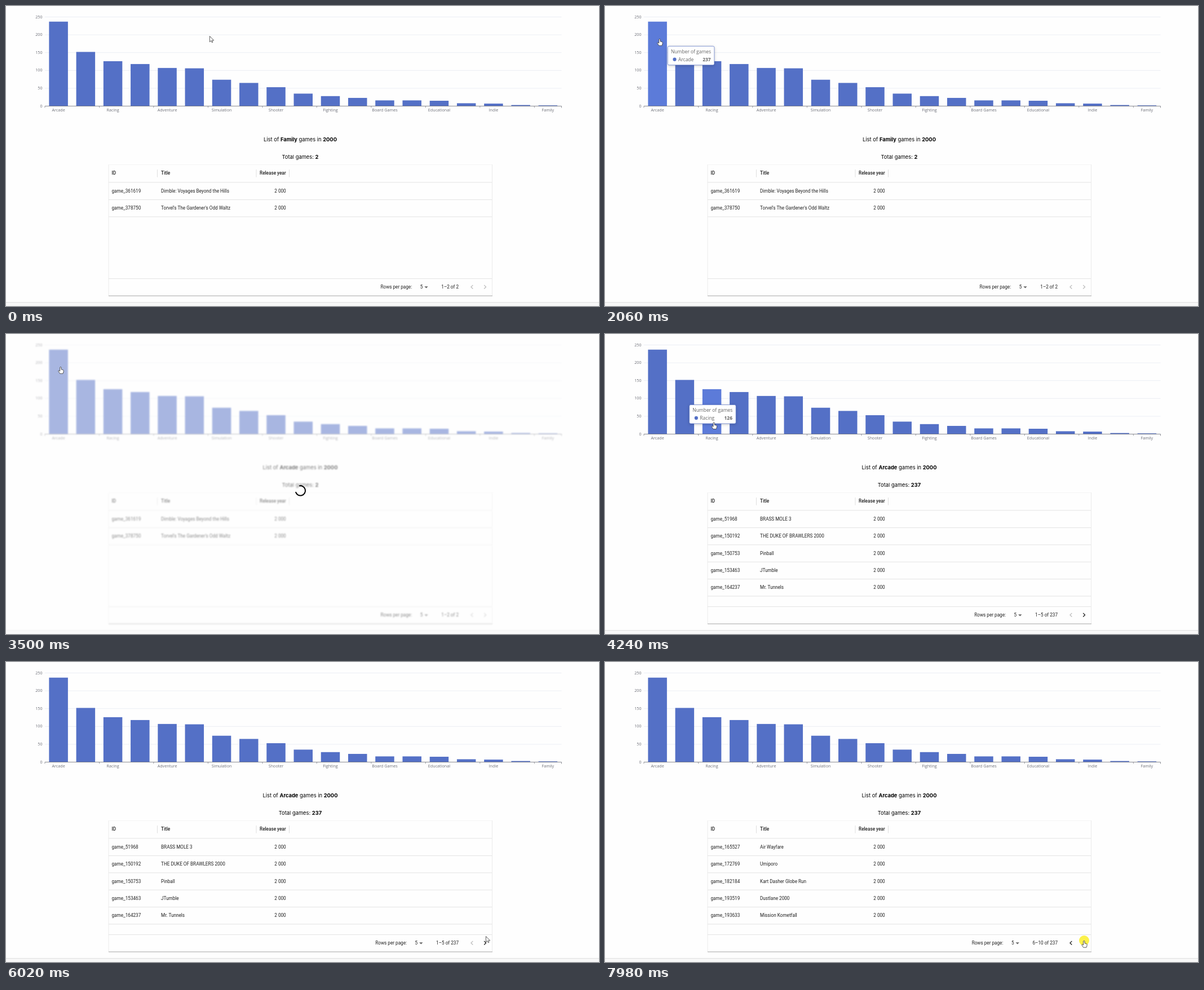
Recreate the animation shown at these times as an HTML page. Size 1052 px wide and 532 px high, loop 8 s.

```html
<!DOCTYPE html>
<html lang="en">
<head>
<meta charset="utf-8">
<title>Games by genre</title>
<style>
  html, body { margin: 0; width: 100%; height: 100%; overflow: hidden; background: #fefefe; }
  svg { display: block; width: 100%; height: 100%; }
  .chart { font: 7.2px "Open Sans", "Noto Sans", sans-serif; fill: #6e7079; }
  .tip { font: 8.45px "Open Sans", "Noto Sans", sans-serif; fill: #666; }
  .tip rect { filter: drop-shadow(.6px 1.2px 2.5px rgba(0, 0, 0, .2)); }
  .heading { font: 9.35px Inter, sans-serif; fill: #000; text-anchor: middle; }
  .grid { font: 8.18px Roboto, sans-serif; fill: #212121; }
  .loading { opacity: .5; filter: blur(1.2px); }
  .end { text-anchor: end; }
  .mid { text-anchor: middle; }
  .bold { font-weight: 700; }
  .medium { font-weight: 500; }
</style>
</head>
<body>
<svg id="stage" viewBox="0 0 1052 532"></svg>
<script>
const DURATION = 8000;
const CLICK = 2820, PICKED = 2890, BLUR = 2990, LOADED = 3560;
const NEXT_CLICK = 6500, NEXT_PICKED = 6640, NEXT_BLUR = 6700, NEXT_LOADED = 7180, LAST_CLICK = 7980;

const genres = ['Arcade', 'Action', 'Racing', 'Sports', 'Adventure', 'Platformer', 'Simulation',
  'Puzzle', 'Shooter', 'RPG', 'Fighting', 'Strategy', 'Board Games', 'Casual', 'Educational',
  'Card', 'Indie', 'Multiplayer', 'Family'];
const counts = [237, 152, 126, 118, 107, 106, 74, 65, 53, 35, 28, 23, 16, 16, 15, 8, 7, 3, 2];
const LEFT = 69, RIGHT = 985.5, BASE = 177.5, UNIT = .632;
const STEP = (RIGHT - LEFT) / genres.length, BAR = 33.5;

const familyRows = [
  ['361619', 'Dimble: Voyages Beyond the Hills'],
  ['378750', "Torvel's The Gardener's Odd Waltz"]];
const arcadeRows = [
  ['51968', 'BRASS MOLE 3'], ['150192', 'THE DUKE OF BRAWLERS 2000'], ['150753', 'Pinball'],
  ['153463', 'JTumble'], ['164237', 'Mr. Tunnels']];
const nextRows = [
  ['165527', 'Air Wayfare'], ['172769', 'Umiporo'], ['182184', 'Kart Dasher Globe Run'],
  ['193519', 'Dustlane 2000'], ['193633', 'Mission Kometfall']];

// Pointer hotspot: time, x, y
const path = [[0, 361, 53], [400, 361, 53], [1160, 243, 64], [1860, 97, 58], [3890, 97, 58],
  [4060, 135, 112], [4240, 193, 156], [4650, 320, 292], [5120, 320, 292], [5880, 847, 480],
  [6020, 851, 486], [6400, 850, 494], [DURATION, 850, 494]];

const between = (t, a, b) => t >= a && t < b;
const clamp = v => Math.max(0, Math.min(1, v));
const text = (x, y, s, cls = '') => `<text x="${x}" y="${y}" dy=".36em" class="${cls}">${s}</text>`;
const bold = s => `<tspan class="bold">${s}</tspan>`;
const rect = (x, y, w, h, fill) => `<rect x="${x}" y="${y}" width="${w}" height="${h}" fill="${fill}"/>`;
const stroke = (d, color, width = 1) =>
  `<path d="${d}" fill="none" stroke="${color}" stroke-width="${width}"/>`;

function pointerAt(t) {
  const i = path.findIndex(key => key[0] > t);
  const [t0, x0, y0] = path[i - 1], [t1, x1, y1] = path[i];
  let k = (t - t0) / (t1 - t0);
  if (t0 === 5120) k = k * k * (3 - 2 * k);
  return { x: x0 + (x1 - x0) * k, y: y0 + (y1 - y0) * k };
}

const slotAt = x => Math.floor((x - LEFT) / STEP);
const barX = i => LEFT + (i + .5) * STEP - BAR / 2;

function barUnder({ x, y }) {
  const i = slotAt(x);
  const inside = between(x, barX(i), barX(i) + BAR) && between(y, BASE - counts[i] * UNIT, BASE);
  return inside ? i : -1;
}

function chart(active) {
  let out = '';
  for (let v = 0; v <= 250; v += 50) {
    const y = BASE - v * UNIT;
    if (v) out += stroke(`M${LEFT} ${y}H${RIGHT}`, '#e6eaf2', .8);
    out += text(64.5, y - .5, v, 'end');
  }
  counts.forEach((n, i) => {
    out += rect(barX(i), BASE - n * UNIT, BAR, n * UNIT, i === active ? '#5c7bd9' : '#5470c6');
    if (i % 2 === 0) {
      out += stroke(`M${LEFT + i * STEP} ${BASE}v3`, '#6e7079', .7);
      out += text(LEFT + (i + .5) * STEP, 184.5, genres[i], 'mid');
    }
  });
  out += stroke(`M${LEFT} ${BASE}H${RIGHT}v3`, '#6e7079', .8);
  return `<g class="chart">${out}</g>`;
}

function headings(genre, total) {
  return `<g class="heading">${text(522, 236.5, `List of ${bold(genre)} games in ${bold(2000)}`)}
    ${text(522, 267.7, `Total games: ${bold(total)}`)}</g>`;
}

function table(rows, range, canGoBack, canGoOn, headerHover) {
  let out = stroke('M182 281V514M862.5 281V514', '#ebebeb') +
    stroke('M182 281.5H862', '#f5f5f5') + stroke('M182 514H863', '#c2c2c2', 1.3) +
    stroke('M182 312.8H862M182 483.5H862', '#e4e4e4') +
    stroke('M268.5 290v13.5M444 290v13.5M502.5 290v13.5', '#dedede');
  out += text(187.5, 296.5, 'ID', 'medium') + text(275, 296.5, 'Title', 'medium') +
    text(496.7, 296.5, 'Release year', 'end medium');
  if (headerHover) {
    out += stroke('M301.5 301V293M297.5 297L301.5 293L305.5 297', '#999', 1.1);
    for (const y of [293, 296.5, 300]) out += `<circle cx="433" cy="${y}" r="1.1" fill="#757575"/>`;
  }
  rows.forEach(([id, title], i) => {
    const y = 328 + i * 30.35;
    out += text(187.5, y, 'game_' + id) + text(275, y, title) + text(496.7, y, '2 000', 'end');
    out += stroke(`M182 ${y + 15.5}H862`, '#e4e4e4');
  });
  const shift = (8 - range.length) * 4.59;
  out += text(720.2 + shift, 498, 'Rows per page:', 'end') + text(734.7 + shift, 498, 5) +
    `<path d="M${742.3 + shift} 497.2h6.4l-3.2 3.2z" fill="#666"/>` + text(803, 498, range, 'end') +
    stroke('M828.3 494.9L825 498.2L828.3 501.5', canGoBack ? '#222' : '#bdbdbd', 1.3) +
    stroke('M848.2 494.9L851.5 498.2L848.2 501.5', canGoOn ? '#222' : '#bdbdbd', 1.3);
  return `<g class="grid">${out}</g>`;
}

// The box trails the pointer and stays where the pointer left the bars.
function tooltip(t) {
  const first = t < 3000;
  const [start, end, fade] = first ? [1798, CLICK + 50, 20] : [3900, 4382, 180];
  const opacity = clamp((t - start) / 200) * clamp((end + fade - t) / fade);
  if (!opacity) return '';
  const seen = first ? t : Math.min(t, 4282);
  const slot = slotAt(pointerAt(seen).x);
  const { x, y } = pointerAt(Math.min(t - 180, 4282));
  return `<g class="tip" opacity="${opacity}" transform="translate(${x + 14} ${y + 13})">
    <rect x=".3" y=".3" width="82.6" height="33.4" rx="2.4" fill="#fff" stroke="#5470c6" stroke-width=".7"/>
    ${text(6, 9.8, 'Number of games')}<circle cx="12.5" cy="23.7" r="3.1" fill="#5470c6"/>
    ${text(19, 23.8, genres[slot])}${text(76.7, 23.8, counts[slot], 'end bold')}</g>`;
}

function spinner(t) {
  const angle = 255 + (t - 3500) * .36;
  return `<path d="M8.7 0A8.7 8.7 0 1 1 0 -8.7" fill="none" stroke="#000" stroke-width="2"
    transform="translate(522.3 277.8) rotate(${angle})"/>`;
}

function pointer({ x, y }, hand) {
  const shape = hand
    ? 'M-1.3 1Q-.2 -.5 1 1V4.8L4 5.6Q5.3 6 5.2 7.4L4.8 10L4 12.2H-1.3L-4 8.2Q-4.5 6.9 -3.2 6.7L-1.3 8Z'
    : 'M.4 .5V10.7L2.8 8.5L4.4 11.8L5.9 11.1L4.4 8H7.7Z';
  return `<path d="${shape}" transform="translate(${x} ${y})" fill="#fff" stroke="#333"
    stroke-width=".8" stroke-linejoin="round"/>`;
}

function scene(t) {
  const at = pointerAt(t), bar = barUnder(at);
  const loading = between(t, BLUR, LOADED) || between(t, NEXT_BLUR, NEXT_LOADED);
  const clicking = between(t, CLICK, PICKED) || between(t, NEXT_CLICK, NEXT_PICKED) || t >= LAST_CLICK;
  const arcade = t >= LOADED, secondPage = t >= NEXT_PICKED;
  const rows = !arcade ? familyRows : t < NEXT_LOADED ? arcadeRows : nextRows;
  const range = !arcade ? '1–2 of 2' : secondPage ? '6–10 of 237' : '1–5 of 237';
  const headerHover = between(at.x, 269, 444) && between(at.y, 281, 313);
  const onNext = Math.hypot(at.x - 850, at.y - 498) < 10;
  const hand = (bar >= 0 || onNext) && !between(t, PICKED, BLUR);

  return `<g class="${loading ? 'loading' : ''}">
      ${rect(0, 525, 1052, 1.6, '#e3e3e3')}${rect(0, 526.6, 1052, 5.4, '#f8f8f8')}
      ${chart(loading ? -1 : bar)}
      ${headings(t < PICKED ? 'Family' : 'Arcade', arcade ? 237 : 2)}
      ${table(rows, range, secondPage, arcade, headerHover)}
    </g>
    ${loading ? spinner(t) : tooltip(t)}
    ${clicking ? `<circle cx="${at.x}" cy="${at.y}" r="9" fill="#faee2c" opacity=".85"/>` : ''}
    ${pointer(at, hand)}`;
}

const stage = document.getElementById('stage');
const startTime = performance.now();
function draw() {
  stage.innerHTML = scene((performance.now() - startTime) % DURATION);
  requestAnimationFrame(draw);
}
draw();
</script>
</body>
</html>
```
